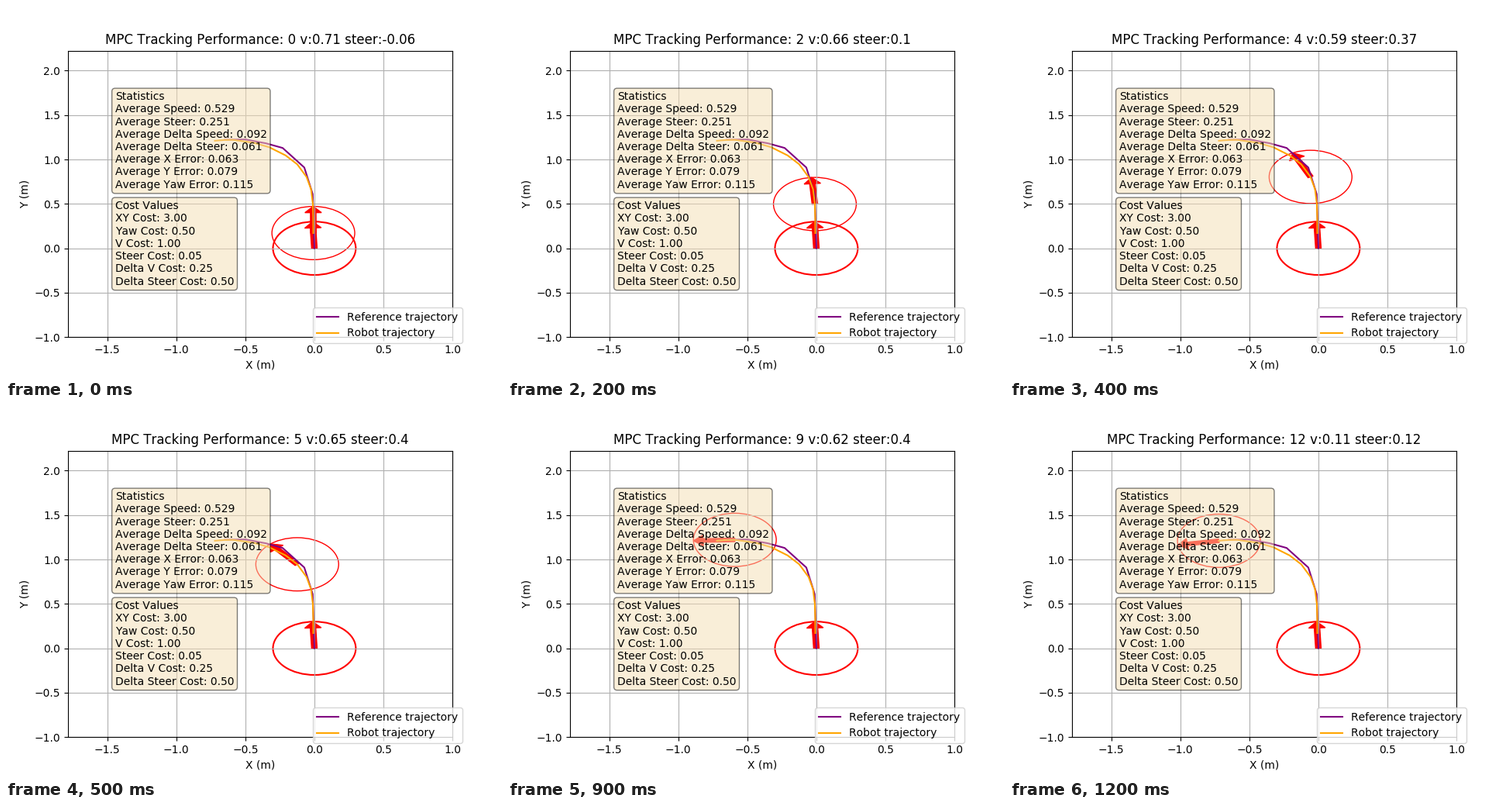
These frames come from a looping animation (640x480 px, 1.3 s). A matplotlib script:

```python
import numpy as np
import matplotlib.pyplot as plt
from matplotlib.animation import FuncAnimation
from matplotlib.patches import Circle, FancyArrow

plt.rcParams["font.family"] = "DejaVu Sans"
plt.rcParams["text.kerning_factor"] = 6  # classic whole-pixel kerning

RADIUS = 0.3
WHEELBASE = 0.261
DT = 0.242
START_YAW = np.radians(92.5)

# Control inputs per step; the path follows from the bicycle model
speeds = [0.71, 0.69, 0.66, 0.69, 0.59, 0.65, 0.54,
          0.62, 0.53, 0.62, 0.27, 0.16, 0.11]
steers = np.interp(range(len(speeds)), [0, 2, 4, 5, 9, 12],
                   [-0.06, 0.1, 0.37, 0.4, 0.4, 0.12])

COURSE = [(0, 0), (-0.012, 0.61), (-0.073, 0.91), (-0.23, 1.13),
          (-0.35, 1.182), (-0.5, 1.226), (-0.65, 1.222)]

STATS = """Statistics
Average Speed: 0.529
Average Steer: 0.251
Average Delta Speed: 0.092
Average Delta Steer: 0.061
Average X Error: 0.063
Average Y Error: 0.079
Average Yaw Error: 0.115"""

COSTS = """Cost Values
XY Cost: 3.00
Yaw Cost: 0.50
V Cost: 1.00
Steer Cost: 0.05
Delta V Cost: 0.25
Delta Steer Cost: 0.50"""


def drive():
    x, y, yaw = 0, 0, START_YAW
    poses = []
    for v, steer in zip(speeds, steers):
        x += v * DT * np.cos(yaw)
        y += v * DT * np.sin(yaw)
        yaw += v * DT / WHEELBASE * np.tan(steer)
        poses.append((x, y, yaw))
    return poses


def add_robot(x, y, yaw, lw):
    circle = Circle((x, y), RADIUS, fill=False, ec="red", lw=lw)
    arrow = FancyArrow(x, y, RADIUS * np.cos(yaw), RADIUS * np.sin(yaw),
                       width=0.04, head_width=0.12, head_length=0.07,
                       length_includes_head=True, color="red")
    ax.add_patch(circle)
    ax.add_patch(arrow)
    return circle, arrow


def add_box(top, text):
    ax.text(0.22, 1 - top / 480, text, transform=fig.transFigure,
            fontsize=10, va="top",
            bbox=dict(boxstyle="round", facecolor="wheat", alpha=0.5))


fig, ax = plt.subplots(figsize=(6.4, 4.8), dpi=100)
fig.subplots_adjust(left=0.125, right=0.9, bottom=0.11, top=0.88)
ax.set_xlim(-1.785, 1)
ax.set_ylim(-1, 2.226)
ax.set_xticks(np.arange(-1.5, 1.1, 0.5))
ax.set_yticks(np.arange(-1, 2.1, 0.5))
ax.set_xlabel("X (m)")
ax.set_ylabel("Y (m)")
ax.grid(True)

poses = drive()
add_robot(0, 0, START_YAW, 1.5)
circle, arrow = add_robot(*poses[0], 1)

ax.plot(*zip(*COURSE), color="purple", label="Reference trajectory")
ax.plot(*list(zip(*poses))[:2], color="orange", label="Robot trajectory")
add_box(110.3, STATS)
add_box(251.3, COSTS)
ax.legend(loc="lower right", bbox_to_anchor=(1.04, -0.04))
title = ax.set_title("")


def update(i):
    x, y, yaw = poses[i]
    circle.center = x, y
    arrow.set_data(x=x, y=y, dx=RADIUS * np.cos(yaw), dy=RADIUS * np.sin(yaw))
    v, steer = speeds[i], round(float(steers[i]), 2)
    title.set_text(f"MPC Tracking Performance: {i} v:{v} steer:{steer}")
    return circle, arrow, title


anim = FuncAnimation(fig, update, frames=len(speeds), interval=100,
                     repeat=True, repeat_delay=0)
plt.show()
```
